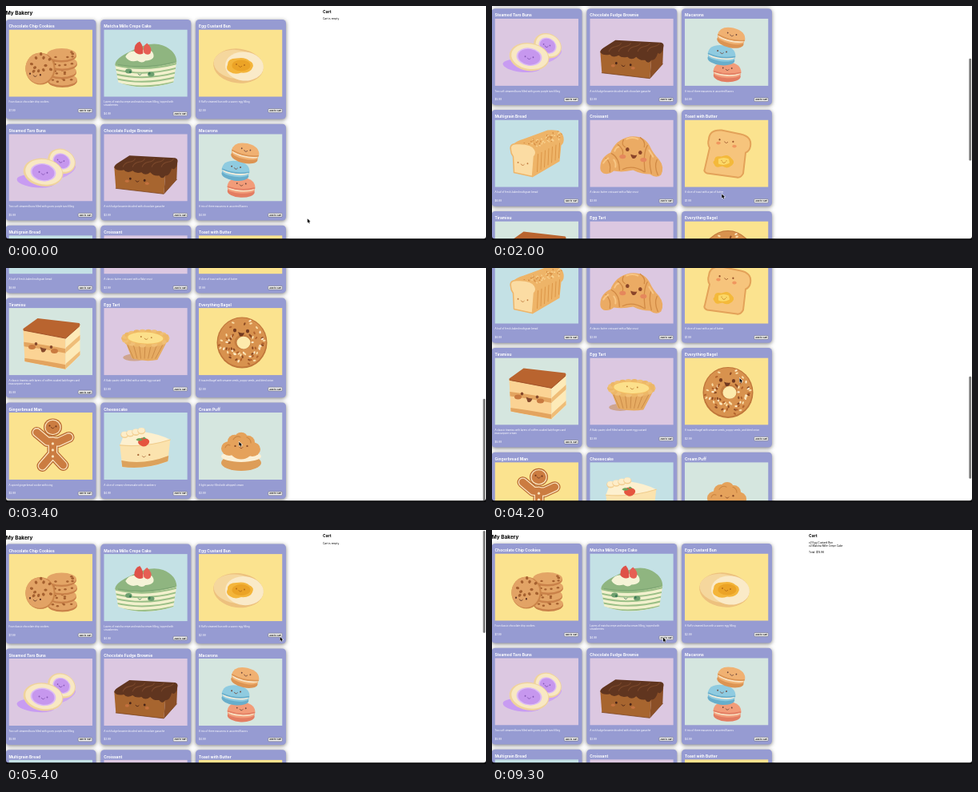
Write an HTML page with a canvas that moves like this. It is 600 px wide and 293 px high and loops after 9.4 s.

```html
<!DOCTYPE html>
<html lang="en">
<head>
<meta charset="utf-8">
<title>My Bakery</title>
<style>
html, body { margin: 0; width: 100%; height: 100%; overflow: hidden; background: #fff; }
canvas { display: block; width: 600px; height: 293px; }
</style>
</head>
<body>
<canvas id="stage"></canvas>
<script>
const W = 600, H = 293, LOOP = 9400, STEP = 100;
const canvas = document.getElementById('stage');
const dpr = window.devicePixelRatio || 1;
canvas.width = Math.round(W * dpr);
canvas.height = Math.round(H * dpr);
const ctx = canvas.getContext('2d');

const YELLOW = '#fbe38f', BLUE = '#c4e1e5', LILAC = '#dcc8e1', MINT = '#d5e6df';

// Drawing helpers
function oval(x, y, rx, ry, color, rot = 0) {
  ctx.beginPath();
  ctx.ellipse(x, y, rx, ry, rot, 0, 7);
  ctx.fillStyle = color;
  ctx.fill();
}
function fill(d, color) {
  ctx.fillStyle = color;
  ctx.fill(new Path2D(d));
}
function line(d, color, width) {
  ctx.strokeStyle = color;
  ctx.lineWidth = width;
  ctx.lineCap = ctx.lineJoin = 'round';
  ctx.stroke(new Path2D(d));
}
function inside(d, draw) {
  ctx.save();
  ctx.clip(new Path2D(d));
  draw();
  ctx.restore();
}
function face(x, y, w, color, rot = 0, r = 1.1) {
  ctx.save();
  ctx.translate(x, y);
  ctx.rotate(rot);
  oval(-w / 2, 0, r, r * 1.1, color);
  oval(w / 2, 0, r, r * 1.1, color);
  line('M-2 1.6Q0 4.6 2 1.6', color, 0.8);
  ctx.restore();
}
function text(str, x, y, size, color, weight = 400) {
  ctx.save();
  ctx.translate(x, y);
  ctx.scale(0.1, 0.1);
  ctx.font = `${weight} ${size * 10}px Inter, sans-serif`;
  ctx.fillStyle = color;
  ctx.fillText(str, 0, 0);
  ctx.restore();
}
function random(seed) {
  return () => (seed = (seed * 16807) % 2147483647) / 2147483647;
}

// Illustrations, drawn inside a 104.5 x 84 picture
function cookies() {
  const rnd = random(11);
  for (let i = 3; i >= 0; i--) {
    const y = 31 + i * 10.5, x = 66 + (i % 2);
    oval(x, y + 2, 18.5, 8, '#c98149');
    oval(x, y, 18.3, 7.6, '#e3a566');
    for (let k = 0; k < 6; k++) oval(x - 12 + rnd() * 27, y - 3 + rnd() * 8, 1.7, 1.2, '#a5602f');
  }
  oval(39.5, 49, 18.6, 20, '#cb8549');
  oval(38.5, 48.5, 17.6, 19.2, '#e2a365');
  for (let k = 0; k < 11; k++) {
    const a = k * 2.4, r = 7 + (k % 3) * 3.7;
    oval(39 + Math.cos(a) * r, 45 + Math.sin(a) * r, 2.1, 1.7, '#a5602f', a);
  }
  face(33, 56, 13, '#5f3324', 0.12);
}
function matcha() {
  const side = 'M14 43Q50 51 91 40L87 66Q50 78 18 66Z';
  fill(side, '#f2f0cd');
  inside(side, () => {
    for (let i = 0; i < 5; i++) {
      const y = 44 + i * 5.6;
      line(`M12 ${y}Q50 ${y + 10} 93 ${y - 2}`, '#9abf86', 2);
    }
  });
  fill('M14 44Q14 36 34 27Q58 14 74 20Q91 27 91 41Q52 53 14 44Z', '#8fb580');
  line('M18 44Q50 50 89 41', '#75a06e', 0.8);
  fill('M27 34Q31 26 39 27Q44 22 51 26Q60 24 62 31Q64 38 52 39Q48 43 42 39Q32 42 27 34Z', '#f5f3d7');
  fill('M38 27Q38 17 45 15Q50 21 49 30Q43 33 38 27Z', '#df5148');
  fill('M50 29Q48 20 54 17Q62 24 58 30Q54 33 50 29Z', '#e65f54');
  oval(31, 52, 4.2, 3, '#6ea06f');
  oval(59, 56, 4.2, 3, '#6ea06f');
  face(45, 54, 24, '#3f7a56', 0.08, 1.5);
}
function eggBun() {
  oval(49.5, 45.5, 31.5, 21.5, '#edc17e', 0.12);
  oval(47, 43.5, 28.5, 18, '#f5d79d', 0.12);
  oval(57, 46, 24, 18, '#faeac8', 0.1);
  fill('M36 44Q36 36 47 36Q58 34 63 39Q70 42 67 48Q64 55 53 54Q45 57 39 53Q33 50 36 44Z', '#f4b53a');
  oval(53, 45, 11.5, 7, '#eba326');
  face(52, 44, 10, '#b56b17', 0.1, 0.9);
}
function taroBuns() {
  oval(34, 59, 24, 8, '#c89cf2', 0.1);
  oval(70, 47, 15, 6, '#cda5f1', -0.5);
  [[66, 34, 18, 15, 0.5], [43, 48, 25, 17.5, 0.15]].forEach(([x, y, rx, ry, rot]) => {
    oval(x, y, rx, ry, '#efd39c', rot);
    oval(x + 0.8, y - 0.5, rx - 1.8, ry - 1.8, '#f8e8c3', rot);
    oval(x, y, rx * 0.64, ry * 0.64, '#dcbcf5', rot);
    oval(x, y, rx * 0.56, ry * 0.56, '#c697ee', rot);
  });
  face(65, 33, 8, '#8355b3', 0.2, 0.8);
  face(43, 48, 10, '#8355b3', 0.1, 0.9);
}
function brownie() {
  fill('M13 41L77 49L75 75L15 68Z', '#a7652f');
  fill('M77 49L92 33L91 57L75 75Z', '#8b4f27');
  fill('M13 42Q13 39 18 36L32 27L89 30Q93 31 92 35L91 40Q88 46 85 43Q82 53 77 52Q73 58 69 52Q62 53 58 48Q52 53 47 48Q40 50 36 46Q29 50 25 45Q16 47 13 42Z', '#60351f');
  for (let i = 0; i < 5; i++) {
    const x = 24 + i * 12;
    line(`M${x} 41Q${x + 2} 36 ${x + 8} 35T${x + 15} 31`, '#7b482b', 1.1);
  }
  line('M15 68L75 75L91 57', '#7c4420', 0.8);
  oval(29, 59, 2.5, 1.8, '#c4713e');
  oval(54, 62, 2.5, 1.8, '#c4713e');
  face(42, 57, 18, '#4a2518', 0.12, 1.4);
}
function macaron(x, y, rot, light, dark, cream) {
  ctx.save();
  ctx.translate(x, y);
  ctx.rotate(rot);
  oval(0, 5, 17, 7.5, dark);
  oval(0, 2, 17, 5.5, light);
  oval(0, 0.8, 16.5, 4.4, cream);
  fill('M-17.5 0Q-17 -12 0 -12.5Q17 -12 17.5 0Q0 6 -17.5 0Z', light);
  line('M-16.5 0Q0 5.2 16.5 0', dark, 1.7);
  face(0, -5, 11, '#70483c', 0, 0.9);
  ctx.restore();
}
function macarons() {
  macaron(53, 67, 0.05, '#f29c79', '#e37d62', '#f8dfc0');
  macaron(46, 46, 0.12, '#8fcbe0', '#68aecb', '#f6eedb');
  macaron(58, 24, 0.22, '#f0b172', '#dc9453', '#f9e5c6');
}
function bread() {
  const body = 'M23 31Q26 27 36 24L66 13Q84 11 86 22Q87 29 83 32L81 52L47 72L40 40Z';
  fill(body, '#eeb468');
  inside(body, () => {
    const rnd = random(5);
    for (let i = 0; i < 7; i++) line(`M${54 + i * 4.5} ${43 - i * 2.3}l-1 ${22 - i * 0.6}`, '#dc9647', 1);
    for (let i = 0; i < 75; i++) {
      const x = 28 + rnd() * 56;
      oval(x, 30 - (x - 28) * 0.32 + rnd() * 12, 1.2, 0.7, i % 2 ? '#f9d391' : '#d48d43', i);
    }
  });
  const front = 'M20 38Q18 30 27 30Q46 29 50 37Q53 42 49 46L47 71L24 66L23 46Q20 42 20 38Z';
  fill(front, '#fbdca3');
  line(front, '#eeb569', 1.5);
  face(35, 54, 12, '#c07a40', 0.12, 0.9);
}
function croissant() {
  fill('M13 60Q13 47 26 41Q32 25 50 21Q68 19 75 33Q79 42 86 49Q94 59 89 69Q83 74 75 68Q64 68 54 63Q41 66 30 64Q24 69 17 67Q13 65 13 60Z', '#ebab64');
  ['M27 42Q37 47 37 63', 'M35 31Q43 37 41 44', 'M72 32Q66 42 69 65', 'M77 42Q73 52 77 67', 'M20 48Q27 54 25 65', 'M42 25Q39 31 44 34', 'M63 22Q70 27 68 34', 'M84 50Q80 58 85 69', 'M41 62Q54 56 68 65']
    .forEach(d => line(d, '#d18a45', 1.3));
  ['M46 24Q53 21 60 24', 'M17 54Q19 50 23 48', 'M74 38Q77 43 79 46', 'M31 39Q33 34 36 34', 'M30 50Q33 54 32 59'].forEach(d => line(d, '#f8c684', 2));
  oval(41, 46, 4, 2.7, '#e5875c');
  oval(67, 50, 4, 2.7, '#e5875c');
  oval(47, 37, 2.3, 2.5, '#8a4529');
  oval(63, 41, 2.3, 2.5, '#8a4529');
  fill('M51 43Q55 45 59 44Q57 50 53 48Q51 46 51 43Z', '#8a4529');
}
function toast() {
  const slice = 'M30 24Q31 12 46 13L70 18Q84 21 82 33Q81 39 76 41L73 67Q70 73 65 72L28 67Q23 65 25 61L31 35Q28 30 30 24Z';
  fill(slice, '#f6c47c');
  line(slice, '#e3a259', 2);
  oval(42, 29, 2.7, 1.9, '#f0975f');
  oval(62, 33, 2.7, 1.9, '#f0975f');
  face(52, 26, 17, '#9a552d', 0.15);
  fill('M37 51Q37 44 46 46Q54 42 58 48Q64 53 59 57Q53 62 47 58Q38 61 37 56Q34 53 37 51Z', '#f4b93a');
  fill('M42 49Q49 46 55 49L56 54Q49 58 42 55Z', '#fbd868');
  face(49, 51, 6, '#c78329', 0.1, 0.6);
}
function tiramisu() {
  const front = 'M18 27L71 37L71 77L20 67Z', right = 'M71 37L89 21L89 59L71 77Z';
  fill(front, '#fbd394');
  fill(right, '#fdeab8');
  inside(front, () => [45, 65].forEach(y => line(`M17 ${y}Q42 ${y + 3} 72 ${y + 9}`, '#e3a45f', 5.5)));
  inside(right, () => [54, 74].forEach(y => line(`M70 ${y}L91 ${y - 19}`, '#efbd78', 4.5)));
  fill('M18 26L36 13L88 19Q90 21 88 23L71 38L18 28Z', '#b9642f');
  line('M19 28L71 38L88 23', '#a2532a', 1);
  oval(29, 49, 4.5, 3, '#c97a40');
  oval(57, 54, 4.5, 3, '#c97a40');
  oval(34, 45, 1.8, 2, '#85482b');
  oval(53, 49, 1.8, 2, '#85482b');
  fill('M39 49Q43 51 47 51Q45 57 41 55Z', '#85482b');
}
function eggTart() {
  oval(38, 62, 14, 4.5, '#cfa58f');
  fill('M26 40L35 63Q51 68 67 65L79 42Z', '#e6ab62');
  for (let i = 0; i < 7; i++) line(`M${30 + i * 7.2} 47L${37 + i * 4.6} 63`, '#cc8c48', 1);
  for (let i = 0; i < 22; i++) {
    const a = i * Math.PI / 11;
    oval(52 + Math.cos(a) * 26, 38 + Math.sin(a) * 8.5, 4.2, 3, i % 2 ? '#ecb768' : '#f0bf76');
  }
  oval(52, 37.5, 24, 8, '#f2bd63', 0.04);
  oval(52, 37.5, 22, 7, '#fce08b', 0.04);
  face(53, 36.5, 13, '#c18239', 0.08, 0.9);
}
function bagel() {
  oval(54, 43.5, 31.5, 32, '#c0763a');
  oval(54, 43, 30, 30.5, '#d8924e');
  const rnd = random(23), seeds = ['#fdebc8', '#8a4a24', '#f9dca6', '#b3642d'];
  for (let i = 0; i < 80; i++) {
    const a = i * 2.4, r = 13 + rnd() * 16;
    if (Math.sin(a) > -0.7 || r > 23) oval(54 + Math.cos(a) * r, 43 + Math.sin(a) * r, 1.9, 1.1, seeds[i % 4], a * 3);
  }
  oval(55, 42.5, 10.5, 9.5, '#c57e40');
  oval(56, 43.5, 8.5, 7.8, '#fdeaac');
  oval(45, 28, 2.1, 2.4, '#70381f');
  oval(61, 29, 2.1, 2.4, '#70381f');
  fill('M49 30Q53 32 57 31Q55 37 51 35Z', '#70381f');
}
function gingerbread() {
  const limbs = 'M35 25L48 36L62 37L75 31M55 36L55 52L42 67M55 52L68 66';
  [[0, '#b7672f'], [1.2, '#fae3bd'], [2.5, '#cb7c41']].forEach(([inset, color]) => {
    line(limbs, color, 14 - inset * 2);
    oval(55, 18.5, 11.5 - inset, 11 - inset, color);
  });
  [39, 47, 55].forEach(y => oval(55, y, 1.6, 1.6, '#fae3bd'));
  face(55, 17, 8, '#6d351d', 0.1, 1);
}
function cheesecake() {
  fill('M20 40L83 34L80 61Q50 72 23 68Z', '#fbe3ae');
  fill('M22 60Q50 66 81 54L80 61Q50 72 23 68Z', '#dca25c');
  fill('M20 41L25 28L49 24Q70 27 83 34Q52 44 20 41Z', '#fdf0cf');
  line('M20 41Q52 44 83 34', '#f0cd8d', 1.1);
  for (let i = 0; i < 4; i++) {
    oval(26 + i * 7, 28 - i * 1.6, 5, 4.2, '#f3cf93');
    oval(26 + i * 7, 27.2 - i * 1.6, 4.2, 3.4, '#fdedc9');
  }
  fill('M43 36Q45 30 52 32Q59 34 56 39Q51 45 46 41Q42 39 43 36Z', '#e5553f');
  fill('M40 34Q44 30 49 34Q44 37 40 34M48 33Q50 28 53 33Z', '#6fa35a');
  face(50, 53, 14, '#a8693b');
}
function creamPuff() {
  oval(53, 63, 25, 10, '#dd9d58');
  oval(53, 55, 25, 7, '#fbf0d5');
  [[38, 45, 10], [67, 46, 10], [45, 36, 9], [61, 37, 9], [53, 32, 8], [53, 45, 15]]
    .forEach(([x, y, r]) => oval(x, y, r, r * 0.9, '#e5a25b'));
  ['M43 34Q47 28 52 31', 'M60 31Q65 33 65 38', 'M33 44Q35 39 39 41'].forEach(d => line(d, '#cb8642', 1.1));
  face(53, 42, 15, '#8a4b27');
}

const ROWS = [17, 147.8, 274.7, 401.6, 532.4];
const COLS = [-0.5, 118.3, 237];
const PRODUCTS = [
  ['Chocolate Chip Cookies', '$7.99', YELLOW, cookies, 'Four classic chocolate chip cookies'],
  ['Matcha Mille Crepe Cake', '$4.99', BLUE, matcha, 'Layers of matcha crepe and matcha cream filling, topped with', 'strawberries'],
  ['Egg Custard Bun', '$2.99', YELLOW, eggBun, 'A fluffy steamed bun with a savory egg filling'],
  ['Steamed Taro Buns', '$5.99', LILAC, taroBuns, 'Two soft steamed buns filled with gooey purple taro filling'],
  ['Chocolate Fudge Brownie', '$3.99', LILAC, brownie, 'A rich fudge brownie drizzled with chocolate ganache'],
  ['Macarons', '$4.99', MINT, macarons, 'A trio of three macarons in assorted flavors'],
  ['Multigrain Bread', '$6.99', BLUE, bread, 'A loaf of fresh-baked multigrain bread'],
  ['Croissant', '$3.99', LILAC, croissant, 'A classic butter croissant with a flaky crust'],
  ['Toast with Butter', '$1.99', YELLOW, toast, 'A slice of toast with a pat of butter'],
  ['Tiramisu', '$5.99', MINT, tiramisu, 'A classic tiramisu with layers of coffee-soaked ladyfingers and', 'mascarpone cream'],
  ['Egg Tart', '$3.99', LILAC, eggTart, 'A flaky pastry shell filled with a sweet egg custard'],
  ['Everything Bagel', '$2.99', YELLOW, bagel, 'A toasted bagel with sesame seeds, poppy seeds, and dried onion'],
  ['Gingerbread Man', '$2.99', YELLOW, gingerbread, 'A spiced gingerbread cookie with icing'],
  ['Cheesecake', '$4.99', BLUE, cheesecake, 'A slice of creamy cheesecake with strawberry'],
  ['Cream Puff', '$3.99', MINT, creamPuff, 'A light pastry filled with whipped cream']
];

function card(product, index) {
  const [title, price, color, draw, ...desc] = product;
  const row = Math.floor(index / 3);
  const footer = desc.length > 1 ? 3.9 : 0;
  ctx.save();
  ctx.translate(COLS[index % 3], ROWS[row]);
  ctx.save();
  ctx.shadowColor = 'rgba(0,0,0,.5)';
  ctx.shadowBlur = 5 * dpr;
  ctx.shadowOffsetY = 1.2 * dpr;
  ctx.beginPath();
  ctx.roundRect(0, 0, 113, row === 0 || row === 3 ? 124.6 : 120.7, 4.5);
  ctx.fillStyle = '#969bd2';
  ctx.fill();
  ctx.restore();

  text(title, 4, 10.3, 4.9, '#fff', 700);
  ctx.save();
  ctx.translate(4, 12.5);
  ctx.beginPath();
  ctx.rect(0, 0, 104.5, 84.2);
  ctx.clip();
  ctx.fillStyle = color;
  ctx.fillRect(0, 0, 104.5, 84.2);
  draw();
  ctx.restore();

  desc.forEach((str, i) => text(str, 4, 104.3 + i * 3.9, 2.95, '#f4f4fb', 500));
  text(price, 4, 115 + footer, 3.1, '#f4f4fb', 500);
  ctx.beginPath();
  ctx.roundRect(90.8, 111.7 + footer, 17.5, 4.6, 0.8);
  ctx.fillStyle = '#f3f3f3';
  ctx.fill();
  ctx.strokeStyle = '#555';
  ctx.lineWidth = 0.4;
  ctx.stroke();
  text('Add to Cart', 92.2, 115 + footer, 2.7, '#000', 600);
  ctx.restore();
}

// Timelines: [ms, value, ...]
const SCROLL = [[900, 0], [1000, 6], [1100, 19.6], [2000, 144.6], [2700, 292], [3000, 357], [3300, 364],
  [4000, 364], [4100, 340], [4200, 301.7], [4700, 95], [5000, 8], [5200, -2], [5400, -0.6], [5700, 0]];
const POINTER = [[100, 376.8, 266.3], [800, 287.3, 235.5], [3100, 287.3, 235.5], [4200, 309.5, 138], [4700, 311, 140],
  [5400, 342.6, 133.8], [5700, 340, 131.5], [6600, 340, 131.5], [7400, 214, 134.8]];
const CLICKS = [[5900, 0], [6400, 0], [7700, 1], [8300, 1]];
const ITEMS = [['Egg Custard Bun', 2.99], ['Matcha Mille Crepe Cake', 4.99]];

function sample(keys, t, ease = u => u) {
  const i = keys.findIndex(k => k[0] > t);
  if (i === 0) return keys[0].slice(1);
  if (i < 0) return keys[keys.length - 1].slice(1);
  const a = keys[i - 1], b = keys[i];
  const u = ease((t - a[0]) / (b[0] - a[0]));
  return a.slice(1).map((v, k) => v + (b[k + 1] - v) * u);
}

function cart(t) {
  text('Cart', 396, 8.8, 5, '#000', 700);
  const counts = [0, 0];
  CLICKS.forEach(([time, item]) => { if (t >= time) counts[item]++; });
  const bought = ITEMS.map(([name, price], i) => ({ name, price, n: counts[i] })).filter(x => x.n);
  if (!bought.length) return text('Cart is empty', 396, 17.2, 3.2, '#000');
  bought.forEach((x, i) => text(`x${x.n} ${x.name}`, 396, 17.2 + i * 3.8, 3.2, '#000'));
  const total = bought.reduce((sum, x) => sum + x.n * x.price, 0);
  text(`Total: $${total.toFixed(2)}`, 396, 20.9 + bought.length * 3.8, 3.2, '#000');
}

function render(t) {
  const [scroll] = sample(SCROLL, t);
  ctx.setTransform(dpr, 0, 0, dpr, 0, 0);
  ctx.fillStyle = '#fff';
  ctx.fillRect(0, 0, W, H);

  ctx.save();
  ctx.translate(0, -scroll);
  text('My Bakery', -0.3, 11, 6.5, '#000', 700);
  cart(t);
  PRODUCTS.forEach(card);
  ctx.restore();

  if (t >= 1000 && t < 5900) {
    ctx.beginPath();
    ctx.roundRect(596.3, 1 + Math.max(0, scroll) * 0.447, 2.8, 128, 1.4);
    ctx.fillStyle = '#7c7c7c';
    ctx.fill();
  }

  fill('M0 288Q0 291.3 3 291.3L597 291.3Q600 291.3 600 288L600 293L0 293Z', '#0b0b0d');

  const [x, y] = sample(POINTER, t, u => u * u * (3 - 2 * u));
  ctx.save();
  ctx.translate(x, y);
  const arrow = 'M0 0L0 5.1L1.2 4L2 6L2.9 5.6L2.1 3.7L3.7 3.6Z';
  line(arrow, '#fff', 0.9);
  fill(arrow, '#000');
  ctx.restore();
}

let shown = -1;
function tick(now) {
  const t = Math.floor((now % LOOP) / STEP) * STEP;
  if (t !== shown) render(shown = t);
  requestAnimationFrame(tick);
}
render(0);
requestAnimationFrame(tick);
</script>
</body>
</html>
```
